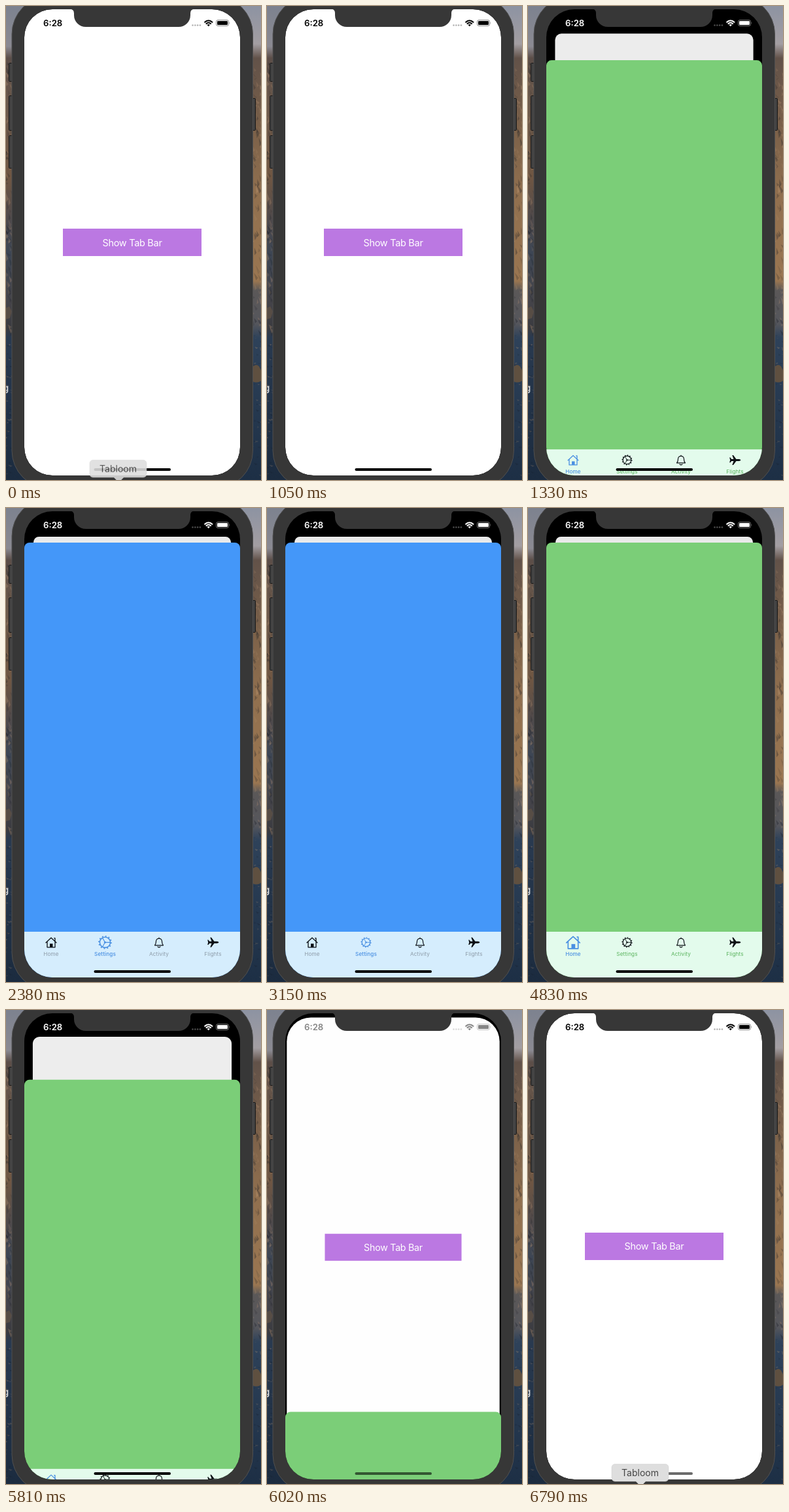
An HTML page for the animation above (6.86 s loop, 390x726 px).

```html
<!DOCTYPE html>
<html lang="en">
<head>
<meta charset="utf-8">
<title>Tab bar demo</title>
<style>
  html, body { margin: 0; width: 100%; height: 100%; overflow: hidden; background: #373737; }
  svg { display: block; width: 390px; height: 726px; }
  text { font-family: Inter, Roboto, sans-serif; }
  .label { font-size: 8.2px; letter-spacing: .1px; text-anchor: middle; }
  .line { fill: none; stroke: currentColor; stroke-width: 1.3; stroke-linejoin: round; stroke-linecap: round; }
  .solid { fill: currentColor; }
</style>
</head>
<body>
<svg viewBox="0 0 390 726">
  <defs>
    <linearGradient id="leftCliff" x2="0" y2="1">
      <stop offset="0" stop-color="#7d828f"/><stop offset=".085" stop-color="#8b8a92"/>
      <stop offset=".11" stop-color="#5c4e48"/><stop offset=".2" stop-color="#6a584a"/>
      <stop offset=".36" stop-color="#705743"/><stop offset=".45" stop-color="#4e494b"/>
      <stop offset=".52" stop-color="#3d4654"/><stop offset=".62" stop-color="#45444a"/>
      <stop offset=".68" stop-color="#3a3b40"/><stop offset=".7" stop-color="#293a50"/>
      <stop offset="1" stop-color="#1b2b3f"/>
    </linearGradient>
    <linearGradient id="rightCliff" x2="0" y2="1">
      <stop offset="0" stop-color="#8d93a2"/><stop offset=".08" stop-color="#a39ea2"/>
      <stop offset=".11" stop-color="#625249"/><stop offset=".25" stop-color="#7a6049"/>
      <stop offset=".4" stop-color="#91704f"/><stop offset=".58" stop-color="#9a7651"/>
      <stop offset=".6" stop-color="#5b5858"/><stop offset=".67" stop-color="#55565c"/>
      <stop offset=".7" stop-color="#2e425a"/><stop offset="1" stop-color="#1d2f45"/>
    </linearGradient>
    <clipPath id="screenClip"><rect x="28" y="5" width="330" height="714" rx="43"/></clipPath>
  </defs>

  <rect width="40" height="726" fill="url(#leftCliff)"/>
  <rect x="350" width="40" height="726" fill="url(#rightCliff)"/>
  <g id="rocks"></g>
  <path d="M377 553Q382 547 387 552L391 560V573Q385 579 377 575Z" fill="#5f5040"/>
  <path d="M-1 463L5 460L9 468L6 478L-1 480Z" fill="#574d45"/>
  <text x="-4" y="590" font-size="13" font-weight="600" fill="#e0e0e0">g</text>

  <g fill="#414141" stroke="#171717">
    <rect x="4.500" y="87.500" width="8" height="28" rx="1"/>
    <rect x="4.500" y="137.500" width="8" height="53" rx="1"/>
    <rect x="4.500" y="198.500" width="8" height="50" rx="1"/>
    <rect x="373.500" y="141.500" width="8" height="49" rx="1"/>
  </g>
  <rect x="9" y="-15" width="368.500" height="754" rx="58" fill="#373737" stroke="#505050"/>

  <g clip-path="url(#screenClip)">
    <rect x="28" y="5" width="330" height="714"/>
    <g id="card">
      <rect id="cardFace" x="28" y="5" width="330" height="714"/>
      <rect x="87" y="341" width="212" height="42" fill="#bb78e2"/>
      <text x="193" y="367.500" font-size="14.5" letter-spacing="-.3" text-anchor="middle" fill="#fff">Show Tab Bar</text>
    </g>
    <g id="sheet">
      <rect id="page" x="28" y="53" width="330" height="690" rx="8"/>
      <rect id="bar" x="28" y="649" width="330" height="100"/>
      <g id="tabs"></g>
    </g>
  </g>

  <path fill="#373737" d="M97 4.500Q104 4.500 104 11V14a18 18 0 0 0 18 18H264a18 18 0 0 0 18-18V11Q282 4.500 289 4.500Z"/>

  <g id="status">
    <text x="57" y="31" font-size="13.2" font-weight="600" fill="currentColor">6:28</text>
    <g class="solid" opacity=".3">
      <circle cx="285.500" cy="29.500" r="1.300"/><circle cx="289.300" cy="29.500" r="1.300"/>
      <circle cx="293.100" cy="29.500" r="1.300"/><circle cx="296.900" cy="29.500" r="1.300"/>
    </g>
    <g class="line" style="stroke-width:2;stroke-linecap:butt">
      <path d="M303.500 25.300Q309.700 19 316 25.300M305.800 27.600Q309.700 23.500 313.700 27.600"/>
    </g>
    <path class="solid" d="M307.500 28.800Q309.700 27 312 28.800L309.700 31.200Z"/>
    <rect x="321.500" y="21.500" width="19" height="9" rx="2.600" fill="none" stroke="currentColor" opacity=".45"/>
    <rect class="solid" x="323" y="23" width="16" height="6" rx="1.300"/>
    <path class="solid" d="M341.500 24.500q1.600 1.500 0 3z" opacity=".45"/>
  </g>

  <rect id="indicator" x="134.500" y="708" width="117.500" height="4" rx="2"/>

  <g id="tip">
    <path fill="#dedede" stroke="#cfcfcf" stroke-width=".5" d="M133 695.500H210a5 5 0 0 1 5 5V717a5 5 0 0 1-5 5H180L174 728H171L165 722H133a5 5 0 0 1-5-5V700.500a5 5 0 0 1 5-5Z"/>
    <text x="171.500" y="714" font-size="14" text-anchor="middle" fill="#444">Tabloom</text>
  </g>
</svg>

<script>
const LOOP = 6860;
const $ = id => document.getElementById(id);
const set = (el, attrs) => { for (const k in attrs) el.setAttribute(k, attrs[k]); };
const clamp = v => Math.min(1, Math.max(0, v));
const mix = (a, b, k) => a + (b - a) * k;
const grey = v => `rgb(${v},${v},${v})`;

const SELECTED = '#4a90e2';
const tabs = [
  { name: 'Home', x: 69, icon: `<path class="line" d="M-8 .5L0-7L8 .5M4.700-6.500H6V-2M-6-1V7.500H6V-1"/>
    <rect class="solid" x="-2" y="2" width="4.500" height="5.500"/>` },
  { name: 'Settings', x: 151.5, icon: `<circle class="line" r="6.300" style="stroke-width:1.200"/>
    <circle class="line" r="7.400" stroke-dasharray="1.500 2.375" style="stroke-linecap:butt"/>
    <circle class="solid" r="1.200"/><path class="line" style="stroke-width:.9" d="M0 0H6M0 0L-3-5.200M0 0L-3 5.200"/>` },
  { name: 'Activity', x: 234, icon: `<path class="line" style="stroke-width:1.200" d="M-6.500 4.500Q-4.500 2.500-4.500-1.500C-4.500-7.500 4.500-7.500 4.500-1.500Q4.500 2.500 6.500 4.500ZM0-6V-7.200M-2 6.500Q0 8.500 2 6.500"/>` },
  { name: 'Flights', x: 316.5, icon: `<path class="solid" d="M9 0Q8.500-1.400 6-1.500H2L-2.500-7.500H-4.200L-2-1.500H-5.300L-7-3.800H-8.300L-7.300 0L-8.300 3.800H-7L-5.300 1.500H-2L-4.200 7.500H-2.500L2 1.500H6Q8.500 1.400 9 0Z"/>` }
];
for (const { name, x, icon } of tabs)
  $('tabs').innerHTML += `<g><g>${icon}</g><text class="label" x="${x}" y="686">${name}</text></g>`;

const looks = {
  0: { page: '#7bce78', bar: '#e3fbec', label: '#59b35c' },
  1: { page: '#4497f9', bar: '#d5edfd', label: '#8d9ba8' },
  3: { page: '#ef6467', bar: '#fadde3', label: '#a8969c' }
};
const taps = [[0, 0], [2328, 1], [3731, 3], [4778, 0]];

// Rock facets and wave streaks on the wallpaper
let seed = 7;
const rnd = () => (seed = seed * 16807 % 2147483647) / 2147483647;
let facets = '';
for (let i = 0; i < 260; i++) {
  const x = i % 2 ? rnd() * 10 - 3 : 376 + rnd() * 13, y = 85 + rnd() * 640;
  const drop = y < 500 ? 3 + rnd() * 7 : rnd() * 2;
  facets += `<path d="M${x} ${y}l${2 + rnd() * 5} ${drop}l-3 ${1 + drop / 3}z" fill="${rnd() < .6 ? '#151a22' : '#c09a78'}" opacity="${.1 + rnd() * .22}"/>`;
}
$('rocks').innerHTML = facets;

// Critically damped spring, remaining distance after ms
const spring = ms => ms < 0 ? 1 : (1 + ms * .018) * Math.exp(-ms * .018);

// How far the sheet is up: 0 hidden, 1 in place
function sheetUp(t) {
  if (t < 5700) return 1 - spring(t - 1060);
  if (t < 5852) return 1 - .15 * ((t - 5700) / 152) ** 2;
  return .85 * spring(t - 5852);
}

function bounce(ms) {
  const keys = [1, 1.4, .9, 1.02, 1];
  const u = clamp(ms / 300) * 4, i = Math.min(3, Math.floor(u));
  return mix(keys[i], keys[i + 1], u - i);
}

function draw(t) {
  const p = sheetUp(t);
  const scale = mix(1, .915, p);
  set($('card'), { transform: `translate(193 ${362 + 8.7 * p}) scale(${scale}) translate(-193 -362)` });
  set($('cardFace'), { rx: mix(43, 9, p), fill: grey(Math.round(mix(255, 234, p * p))) });
  set($('sheet'), { transform: `translate(0 ${673 * (1 - p)})` });
  $('status').style.color = grey(Math.round(255 * clamp(p * 3.2)));

  const [since, current] = taps.filter(tap => tap[0] <= t).pop();
  const look = looks[current];
  set($('page'), { fill: look.page });
  set($('bar'), { fill: look.bar });
  [...$('tabs').children].forEach((tab, i) => {
    const on = i === current, [icon, label] = tab.children;
    tab.style.color = on ? SELECTED : '#0b0f14';
    set(icon, { transform: `translate(${tabs[i].x} 665.300) scale(${on && since ? bounce(t - since) : 1})` });
    set(label, { fill: on ? SELECTED : look.label, 'font-weight': on ? 500 : 400 });
  });

  set($('indicator'), { opacity: mix(1, .58, clamp((t - 5880) / 120)) });
  set($('tip'), { opacity: t >= 6720 ? 1 : clamp(.88 - t / 310) });
}

const start = performance.now();
function tick() {
  draw((performance.now() - start) % LOOP);
  requestAnimationFrame(tick);
}
tick();
</script>
</body>
</html>
```
